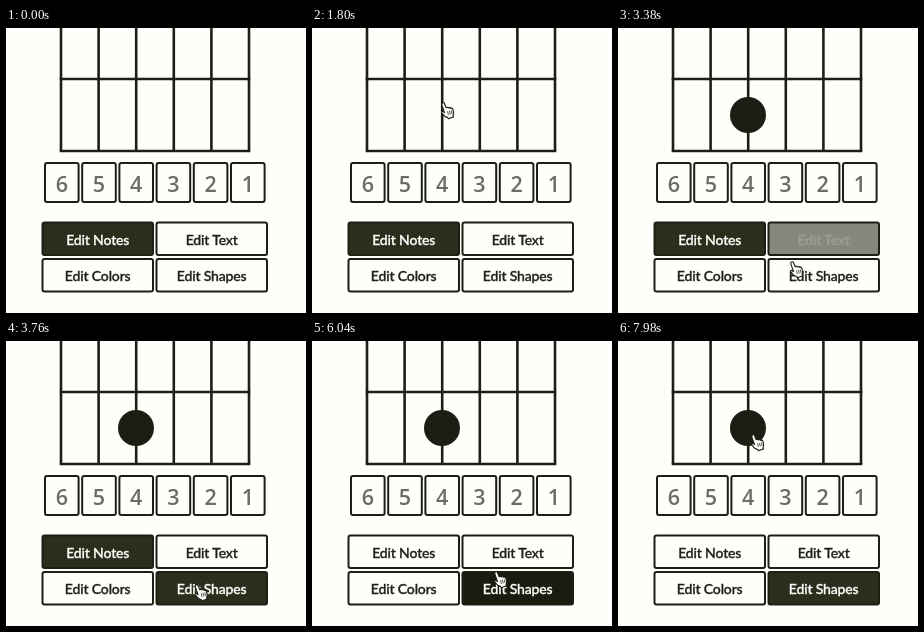
Write an HTML page that moves like this. It is 300 px wide and 285 px high and loops after 8000 ms.

```html
<!DOCTYPE html>
<html lang="en">
<head>
<meta charset="utf-8">
<title>Chord editor</title>
<style>
  html, body { margin: 0; width: 100%; height: 100%; overflow: hidden; background: #fefefb; }
  svg { display: block; width: 300px; height: 285px; }
  text { text-anchor: middle; }
  .outline { fill: none; stroke: #1e1e14; stroke-width: 2; }
  .grid { stroke-width: 2.6; }
  .digit { font: 600 21.5px "Open Sans", sans-serif; fill: #6c6c64; }
  .label { font: 500 14px Lato, sans-serif; letter-spacing: -.15px; stroke-width: .35; }
</style>
</head>
<body>
<svg id="stage" viewBox="0 0 300 285"></svg>
<script>
const LOOP = 8000;
const PAPER = [254, 254, 251], MIDTONE = [133, 133, 122], INK = [43, 46, 28], DEEP = [28, 27, 16];
const FADED = [160, 160, 146], LABEL_DARK = [32, 32, 22];
const stage = document.getElementById('stage');

function add(tag, attributes, parent = stage) {
  const node = document.createElementNS('http://www.w3.org/2000/svg', tag);
  for (const key in attributes) node.setAttribute(key, attributes[key]);
  parent.append(node);
  return node;
}
function write(content, x, y, kind) {
  const node = add('text', { x, y, class: kind });
  node.textContent = content;
  return node;
}

// Fretboard
for (let i = 0; i < 6; i++) add('path', { d: `M${55 + i * 37.6} -2V123`, class: 'outline grid' });
for (const y of [51, 123]) add('path', { d: `M53.7 ${y}H244.3`, class: 'outline grid' });
const note = add('circle', { cx: 130, cy: 87, r: 18, fill: '#1d1d14' });

// String numbers
for (let i = 0; i < 6; i++) {
  const x = 39 + i * 37.2;
  add('rect', { x, y: 135, width: 33.6, height: 39, rx: 2, class: 'outline' });
  write(6 - i, x + 16.8, 164, 'digit');
}

function makeButton(name, column, row) {
  const x = 36.5 + column * 114, y = 194.5 + row * 36.5;
  return {
    box: add('rect', { x, y, width: 110.5, height: 32.5, rx: 2, class: 'outline' }),
    label: write(name, x + 55.2, y + 22, 'label')
  };
}
const notes = makeButton('Edit Notes', 0, 0);
const text = makeButton('Edit Text', 1, 0);
const colors = makeButton('Edit Colors', 0, 1);
const shapes = makeButton('Edit Shapes', 1, 1);

const hand = add('g', { stroke: '#1e1e14', 'stroke-linejoin': 'round' });
add('path', {
  d: 'M1.2 1.2C2 .4 3.3.6 3.7 1.6L5.6 6.2 7.2 5.6 8 6.4 9.6 5.8 10.5 6.8 12 6.6 13 8.4 13.6 12 13 14.6 13.4 16 8 18 7.2 16.8 4 15.4.8 11.6C.2 10.4 1.4 9.6 2.4 10.4L3.8 11.4.8 3Z',
  fill: '#fefefb', 'stroke-width': 1.2
}, hand);
add('path', { d: 'M7 10l1 4M9 9.4l1 4M11 9l.8 3.8', fill: 'none', 'stroke-width': .8 }, hand);

// Cursor stops: time, x, y
const path = [
  [300, 286, 278], [840, 215, 185], [1500, 129, 74], [2400, 129, 74],
  [3000, 160, 192], [3380, 172, 233], [3900, 191, 244], [4780, 191, 244],
  [5000, 192, 254], [5500, 189, 241], [6040, 182, 230], [6650, 98, 77],
  [7260, 112, 84], [7540, 126, 91], [7980, 133, 93]
];
const clamp = v => Math.min(1, Math.max(0, v));
const ramp = (t, start, end) => clamp((t - start) / (end - start));

// Zero slope at turning points keeps the cursor from overshooting.
function slope(i, axis) {
  const a = path[i - 1], b = path[i], c = path[i + 1];
  if (!a || !c) return 0;
  const before = (b[axis] - a[axis]) / (b[0] - a[0]);
  const after = (c[axis] - b[axis]) / (c[0] - b[0]);
  return before * after > 0 ? 2 * before * after / (before + after) : 0;
}
function position(t, axis) {
  let i = 0;
  while (i < path.length - 2 && t > path[i + 1][0]) i++;
  const a = path[i], b = path[i + 1], span = b[0] - a[0];
  const u = ramp(t, a[0], b[0]), v = 1 - u;
  return v * v * (1 + 2 * u) * a[axis] + u * u * (3 - 2 * u) * b[axis]
    + span * u * v * (v * slope(i, axis) - u * slope(i + 1, axis));
}

function blend(from, middle, to, amount) {
  const [a, b, k] = amount < .5 ? [from, middle, amount * 2] : [middle, to, amount * 2 - 1];
  return `rgb(${a.map((v, i) => Math.round(v + (b[i] - v) * k))})`;
}
function paint(button, amount, ink = INK) {
  button.box.style.fill = blend(PAPER, MIDTONE, ink, amount);
  const color = blend(LABEL_DARK, FADED, PAPER, amount);
  button.label.style.fill = button.label.style.stroke = color;
}

function draw(t) {
  paint(notes, 1 - ramp(t, 5150, 5300));
  paint(text, ramp(t, 2980, 3130) - ramp(t, 3305, 3455));
  paint(colors, 0);
  paint(shapes, ramp(t, 3400, 3550), t >= 5860 && t < 6700 ? DEEP : INK);
  note.style.display = t >= 2000 ? '' : 'none';
  hand.style.display = t >= path[0][0] ? '' : 'none';
  hand.setAttribute('transform', `translate(${position(t, 1)} ${position(t, 2)}) scale(.93)`);
}

const start = performance.now();
function tick() {
  draw((performance.now() - start) % LOOP);
  requestAnimationFrame(tick);
}
tick();
</script>
</body>
</html>
```
